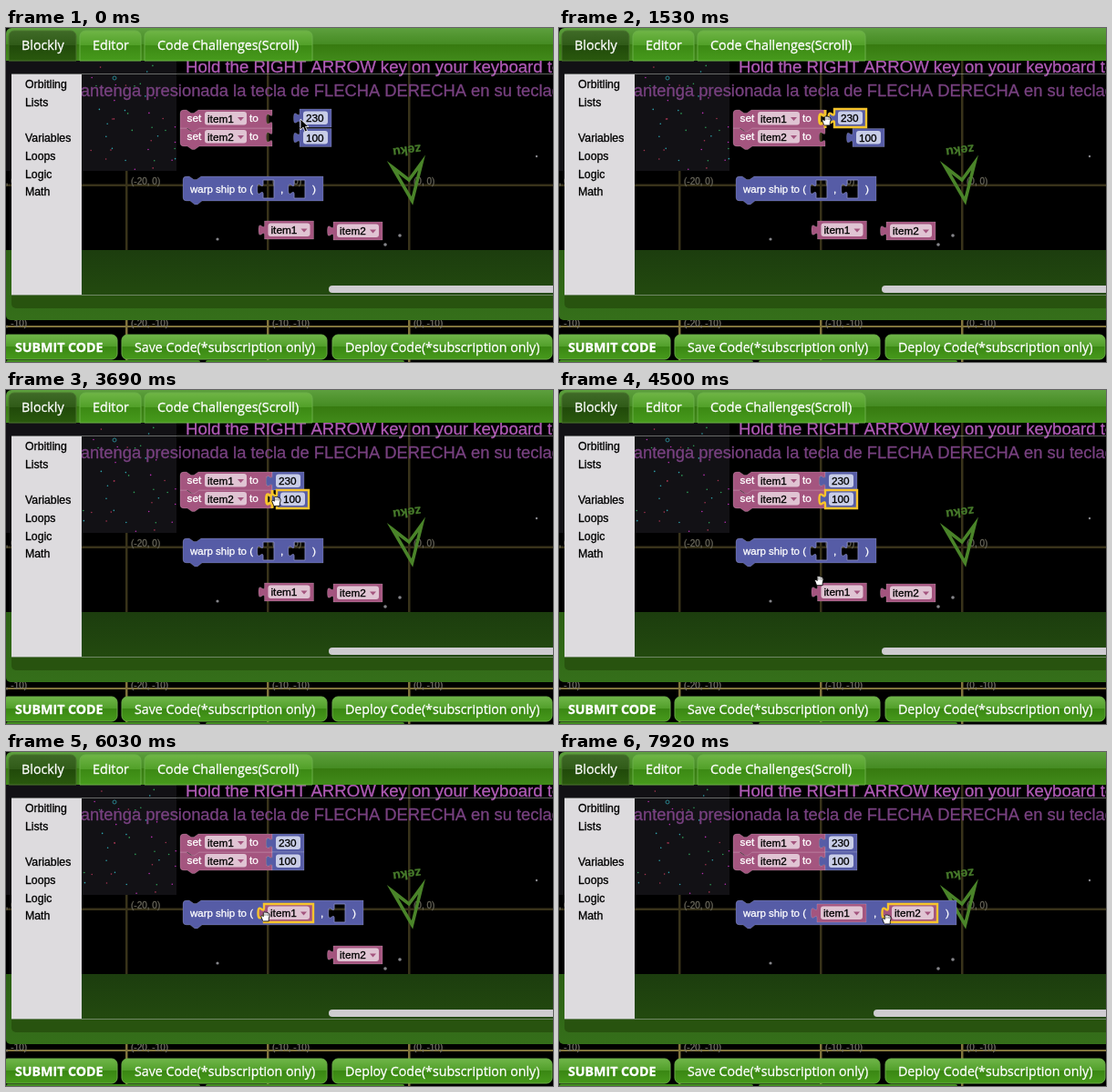
Animation, 600 px wide and 367 px high, one loop 8 s. Source, as an HTML page with a canvas:

```html
<!DOCTYPE html>
<html lang="en">
<head>
<meta charset="utf-8">
<title>Block editor</title>
<style>
html, body { margin: 0; width: 100%; height: 100%; overflow: hidden; background: #000; }
canvas { display: block; }
</style>
</head>
<body>
<canvas id="stage" width="600" height="367"></canvas>
<script>
const c = document.getElementById('stage').getContext('2d');
const LOOP = 8000, STEP = 90;
const SANS = '"Liberation Sans", Arial, sans-serif';
const UI = '"Open Sans", sans-serif';
const PINK = '#a4557f', BLUE = '#565ca6', YELLOW = '#f8c52c';
const EDGE = 'rgba(255,255,255,.16)';

// A thin outline gives the text a slightly heavier weight.
function text(str, x, y, color, size, family = SANS, weight = '') {
  c.font = `${weight} ${size}px ${family}`;
  c.fillStyle = c.strokeStyle = color;
  c.lineWidth = .3;
  c.lineJoin = 'round';
  c.fillText(str, x, y);
  c.strokeText(str, x, y);
  c.lineJoin = 'miter';
}

function rect(x, y, w, h, fill, radius = 0) {
  c.fillStyle = fill;
  c.beginPath();
  c.roundRect(x, y, w, h, radius);
  c.fill();
}

function vertical(y, h, ...colors) {
  const g = c.createLinearGradient(0, y, 0, y + h);
  colors.forEach((color, i) => g.addColorStop(i / (colors.length - 1), color));
  return g;
}

// Light upper half, hard edge in the middle, darker lower half
function gloss(y, h, top, upper, lower, bottom) {
  const g = c.createLinearGradient(0, y, 0, y + h);
  g.addColorStop(0, top);
  g.addColorStop(.5, upper);
  g.addColorStop(.5, lower);
  g.addColorStop(1, bottom);
  return g;
}

function shape(d, fill, stroke, width = 1) {
  const path = new Path2D(d);
  if (fill) { c.fillStyle = fill; c.fill(path, 'evenodd'); }
  if (stroke) { c.strokeStyle = stroke; c.lineWidth = width; c.stroke(path); }
}

function random(seed) {
  const v = Math.sin(seed * 127.1 + 11.7) * 43758.5453;
  return v - Math.floor(v);
}

// Cursor keys: time, x, y
const cursorKeys = [
  [0, 323, 100], [450, 323, 100], [750, 313, 101], [990, 313, 101],
  [1530, 293, 101], [1800, 287, 102], [2000, 287, 102], [2430, 321, 122],
  [2790, 321, 122], [3690, 296, 121.5], [3900, 293, 121.5], [4080, 293, 122],
  [4600, 284, 218], [4770, 284, 218], [5310, 284, 186], [5670, 284, 180],
  [6210, 284, 180], [6750, 359, 214], [6930, 359, 214], [7650, 359, 183], [LOOP, 359, 183]
];

function cursorAt(t) {
  const i = cursorKeys.findIndex(k => k[0] > t);
  const [t0, x0, y0] = cursorKeys[i - 1], [t1, x1, y1] = cursorKeys[i];
  const p = (t - t0) / (t1 - t0), e = p * p * (3 - 2 * p);
  return { x: x0 + (x1 - x0) * e, y: y0 + (y1 - y0) * e };
}

const pieces = [
  { label: '230', color: BLUE, w: 35, x: 322, y: 89, toX: 292, toY: 90, grab: 990, drop: 1800 },
  { label: '100', color: BLUE, w: 35, x: 322, y: 110.5, toX: 292, toY: 110, grab: 2790, drop: 3900 },
  { label: 'item1', color: PINK, w: 54, x: 283.5, y: 212, toX: 283, toY: 167, grab: 4770, drop: 5670 },
  { label: 'item2', color: PINK, w: 54, x: 359, y: 213, toX: 361, toY: 167, grab: 6930, drop: 7650 }
];

function place(piece, t) {
  if (t < piece.grab) return { x: piece.x, y: piece.y };
  if (t >= piece.drop) return { x: piece.toX, y: piece.toY };
  const from = cursorAt(piece.grab), now = cursorAt(t);
  return { x: piece.x + now.x - from.x, y: piece.y + now.y - from.y };
}

const TAB = 'v4c0 8-6.5-6.5-6.5 6s6.5-2 6.5 6';
const plug = (x, y, w) => `M${x} ${y}${TAB}v4h${w}v-20z`;

function field(label, x, y, tint) {
  const isItem = label.startsWith('item');
  rect(x, y, isItem ? 46 : 27, 14.5, tint, 3);
  text(label, x + 3, y + 11.5, '#000', 11.8);
  if (isItem) shape(`M${x + 36} ${y + 6}h7l-3.5 4z`, PINK);
}

function drawPiece(piece, t, selected) {
  const { x, y } = place(piece, t);
  shape(plug(x, y, piece.w), piece.color, selected ? YELLOW : EDGE, selected ? 2.4 : 1);
  field(piece.label, x + 4, y + 2.5, piece.color === PINK ? '#e0c4d3' : '#c8cde7');
}

function drawSetBlock(y, label, first) {
  const top = first ? `M191 ${y + 4}q0-4 4-4` : `M191 ${y}h4`;
  const end = first ? 'H191z' : 'H195q-4 0-4-4z';
  shape(`${top}h3l5 3.5h3l5-3.5H292${TAB}V${y + 20}H212l-5 3.5h-3l-5-3.5${end}`, PINK, EDGE);
  text('set', 198.5, y + 13, '#fff', 11.8);
  field(label, 218, y + 2, '#e0c4d3');
  text('to', 267, y + 13, '#fff', 11.8);
}

function drawWarpBlock(t) {
  const filled = pieces.slice(2).map(p => t >= p.drop);
  const end1 = 282 + (filled[0] ? 56 : 12);
  const slot2 = end1 + 22, end2 = slot2 + (filled[1] ? 56 : 12);
  const sockets = [282, slot2].filter((x, i) => !filled[i]).map(x => plug(x, 167, 12)).join('');
  const body = `M194 167q0-4 4-4h3l5 3.5h3l5-3.5H${end2 + 20}v27H215l-5 4h-3l-5-4h-4q-4 0-4-4z`;
  shape(body + sockets, BLUE, EDGE);
  shape(sockets, null, '#767cba', .8);
  text('warp ship to (', 202, 181, '#fff', 11.5);
  text(',', end1 + 7, 181, '#fff', 11.8);
  text(')', end2 + 8, 181, '#fff', 11.8);
}

function drawSpace(t) {
  rect(0, 0, 600, 367, '#000');
  for (const x of [132, 287, 442]) {
    rect(x - 1, 36, 2.5, 285, '#39331a');
    rect(x - 1, 321, 2.5, 46, '#81743c');
  }
  rect(0, 171.5, 600, 2.5, '#39331a');
  rect(0, 327, 600, 2, '#81743c');
  const labels = [[137, '-20'], [292, '-10'], [447, '0'], [-18, '-30']];
  for (const [x, n] of labels) {
    text(`(${n}, 0)`, x, 172, '#68665a', 10);
    text(`(${n}, -10)`, x, 328, '#77756a', 10);
  }
  for (const [x, y, r] of [[232, 232, 1.6], [416, 238, 1.8], [432, 228, 1.8], [582, 141, 1.2]]) {
    rect(x - r, y - r, r * 2, r * 2, '#85858a', r);
  }
  rect(0, 36, 187, 121, '#121115');
  const dots = ['#b52fb0', '#2fa3ad', '#2f9d58', '#a23450'];
  for (let i = 0; i < 40; i++) {
    const x = 84 + (random(i) * 102 + t * .0006 * random(i + 200)) % 102;
    rect(x, 38 + random(i + 80) * 117, 1.6, 1.6, dots[i % 4], .8);
  }
  c.strokeStyle = '#28808a';
  c.lineWidth = 1;
  c.beginPath();
  c.arc(119, 55, 2, 0, 7);
  c.stroke();
  text('Hold the RIGHT ARROW key on your keyboard to', 197, 49, '#b05bb6', 18.6);
  text('mantenga presionada la tecla de FLECHA DERECHA en su teclado', 66.5, 75, '#784180', 18.35);
  shape('M424 153L442 167L456 148L445.5 190Z', null, '#4a8429', 3.6);
  c.save();
  c.translate(440, 135);
  c.rotate(172 * Math.PI / 180);
  c.textAlign = 'center';
  text('zeku', 0, 5, '#46792a', 14, SANS, 'bold');
  c.restore();
}

function drawTab(x, w, label, active) {
  const fill = active ? gloss(3, 33, '#3f6a27', '#2f5a17', '#214a0a', '#2a590e')
    : gloss(3, 33, '#6fb546', '#509f27', '#3c8a14', '#479a1c');
  rect(x, 3, w, 33, fill, [6, 6, 0, 0]);
  c.strokeStyle = active ? '#4a752f' : '#6aae48';
  c.lineWidth = 1;
  c.stroke();
  text(label, x + 14, 24, '#fff', 14.3, UI);
}

function drawButton(x, w, label, weight) {
  rect(x, 337, w, 27, gloss(337, 27, '#70b649', '#509e29', '#3a8713', '#479a1c'), 6);
  c.strokeStyle = '#68ab45';
  c.lineWidth = 1;
  c.stroke();
  text(label, x + 14, 356, '#fff', 14.2, UI, weight);
}

function drawPanel() {
  rect(0, 244, 600, 77, vertical(244, 77, '#2c6014', '#356f1a'), [0, 0, 0, 5]);
  rect(6, 244, 594, 50, vertical(244, 50, '#1c3d0e', '#234a0f'));
  rect(6, 294, 594, 14, '#28530f', [0, 0, 0, 5]);
  rect(0, 0, 600, 36, gloss(0, 36, '#5d9f3e', '#458b22', '#377a10', '#418a1a'), [6, 0, 0, 0]);
  drawTab(3, 74, 'Blockly', true);
  drawTab(81, 67, 'Editor');
  drawTab(152, 184, 'Code Challenges(Scroll)');
  c.strokeStyle = 'rgba(190,195,190,.5)';
  c.lineWidth = 1;
  c.strokeRect(6.5, 50.5, 600, 243);
  rect(0, 365, 213, 4, '#438d20', 3);
  rect(219, 365, 218, 4, '#438d20', 3);
  drawButton(-4, 126, 'SUBMIT CODE', 'bold');
  drawButton(127, 225, 'Save Code(*subscription only)');
  drawButton(358, 241, 'Deploy Code(*subscription only)');
}

function drawSidebar() {
  rect(6, 51, 77, 242, '#dddbde');
  const entries = [['Orbitling', 66], ['Lists', 86], ['Variables', 125], ['Loops', 145], ['Logic', 164.5], ['Math', 183.5]];
  for (const [label, y] of entries) text(label, 21, y, '#000', 12.3);
}

function drawCursor(t) {
  const { x, y } = cursorAt(t);
  c.save();
  c.translate(x, y);
  c.lineJoin = 'round';
  if (t < 630) {
    shape('M0 0V12L3 9L5 14L7.5 13L5.5 8.5H9Z', '#000', '#fff', .8);
  } else {
    c.scale(.85, .85);
    shape('M-3 6L-5 1Q-5-1-3 0L-2 1V-4Q-1-6 0-4Q1-6 2.5-4Q4-5 4.5-3Q6.5-3 6 0L5 4V7H-2Z', '#fff', '#000', 1);
    shape('M0-3V0M2.5-3V0M4.5-2V0', null, '#333', .7);
  }
  c.restore();
}

function draw(t) {
  drawSpace(t);
  drawPanel();
  drawSetBlock(110, 'item2', false);
  drawSetBlock(90, 'item1', true);
  drawWarpBlock(t);
  const selected = pieces.filter(p => t >= p.grab).pop();
  for (const piece of pieces) if (piece !== selected) drawPiece(piece, t, false);
  if (selected) {
    const { x, y } = place(selected, t);
    const near = Math.hypot(x - selected.toX, y - selected.toY) < 24;
    if (t < selected.drop && near) {
      shape(`M${selected.toX} ${selected.toY}${TAB}v4`, null, YELLOW, 3);
    }
    drawPiece(selected, t, true);
  }
  drawSidebar();
  const scrollX = t >= 7650 ? 345 : 354;
  rect(scrollX, 283, 260, 8, '#ceccd0', 4);
  drawCursor(t);
}

function tick(now) {
  draw(Math.floor((now % LOOP) / STEP) * STEP);
  requestAnimationFrame(tick);
}
requestAnimationFrame(tick);
</script>
</body>
</html>
```
